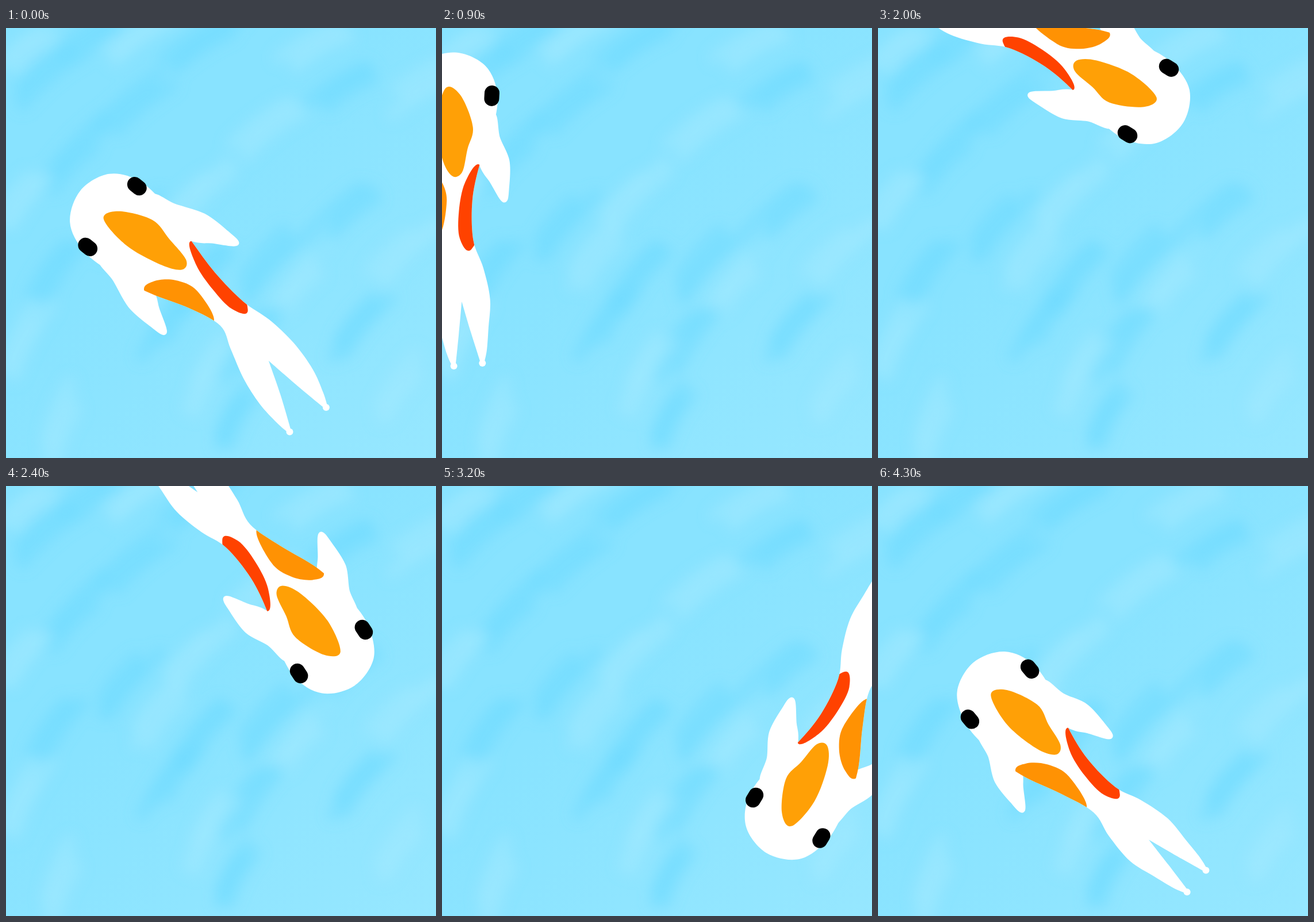
These frames come from a looping animation (748x748 px, 4400 ms). An HTML page:

```html
<!DOCTYPE html>
<html lang="en">
<head>
<meta charset="utf-8">
<title>Koi</title>
<style>
  html, body { margin: 0; width: 100%; height: 100%; overflow: hidden; background: #8ae4ff; }
  svg { display: block; width: 100vw; height: 100vh; }
</style>
</head>
<body>
<svg viewBox="0 0 748 748">
  <defs>
    <filter id="soft" filterUnits="userSpaceOnUse" x="-100" y="-100" width="948" height="948"><feGaussianBlur stdDeviation="11"/></filter>
    <clipPath id="skin"><path id="skinPath"/></clipPath>
    <linearGradient id="depth" x1="0" y1="0" x2="1" y2="1">
      <stop offset=".4" stop-color="#88e3ff"/><stop offset="1" stop-color="#96e7ff"/>
    </linearGradient>
  </defs>
  <rect width="748" height="748" fill="url(#depth)"/>
  <g id="water" fill="none" stroke-linecap="round" filter="url(#soft)"></g>
  <g id="fish">
    <g fill="#fff" stroke="#fff" stroke-width="8" stroke-linejoin="round">
      <path id="finR"/><path id="finL"/>
    </g>
    <path id="body" fill="#fff"/>
    <circle id="tipR" r="6" fill="#fff"/><circle id="tipL" r="6" fill="#fff"/>
    <path id="crown" fill="#ffa006"/>
    <g clip-path="url(#skin)">
      <path id="patch" fill="#ff9203"/>
      <path id="stripe" fill="#ff4200"/>
    </g>
    <rect id="eyeR" x="-18" y="-13" width="36" height="26" rx="13"/>
    <rect id="eyeL" x="-18" y="-13" width="36" height="26" rx="13"/>
  </g>
</svg>
<script>
const LOOP = 4400, STEP = 100;
const el = id => document.getElementById(id);
const dir = deg => [Math.cos(deg * Math.PI / 180), Math.sin(deg * Math.PI / 180)];
const fmt = p => p[0].toFixed(1) + ' ' + p[1].toFixed(1);

let seed = 7;
const rand = () => (seed = seed * 16807 % 2147483647) / 2147483647 - .5;

// Each spot is a bundle of strands that follow the current
function paintWater(color, spots) {
  for (const [x, y] of spots) {
    const [c, s] = dir(-38 - (35 * y - 14 * x) / 748);
    for (let i = 0; i < 3; i++) {
      const off = (i - 1) * 14 + rand() * 8, slide = rand() * 40, half = 55 + rand() * 30;
      const at = (u, v) => fmt([x + c * u - s * v, y + s * u + c * v]);
      el('water').innerHTML += `<path d="M${at(slide - half, off)}Q${at(slide, off - 10)} ${at(slide + half, off)}"
        stroke="${color}" stroke-width="22" opacity=".5"/>`;
    }
  }
}
paintWater('#70dbff', [[60, 90], [150, 15], [225, 130], [120, 225], [345, 25], [210, 340], [90, 420],
  [450, 415], [345, 430], [290, 510], [425, 540], [400, 680], [580, 110], [590, 320], [615, 520]]);
paintWater('#9feaff', [[30, 45], [230, 15], [25, 300], [325, 300], [265, 400], [460, 170], [540, 35],
  [735, 95], [520, 440], [355, 600], [30, 550], [100, 690], [690, 620], [690, 390]]);

// Places the head passes: time, x, y, angle of the back
const route = [
  [0, 185, 328, 39], [500, 68, 242, 50], [800, 5, 138, 82], [1050, 70, 85, 110],
  [1300, 197, 32, 136], [2000, 470, 127, 212], [2400, 566, 288, 236], [2800, 623, 424, 254],
  [3050, 640, 525, 274], [3350, 545, 612, 330], [3700, 387, 596, 377], [4300, 212, 362, 410]
];
const shift = ([t, x, y, a], n) => [t + n * LOOP, x, y, a + n * 360];
const keys = [shift(route[route.length - 1], -1), ...route, shift(route[0], 1), shift(route[1], 1)];

function hermite(a, b, m, n, f) {
  const g = f * f, h = g * f;
  return (2 * h - 3 * g + 1) * a + (h - 2 * g + f) * m + (3 * g - 2 * h) * b + (h - g) * n;
}
function slope(a, b, m, n, f) {
  return 6 * (f * f - f) * (a - b) + (3 * f * f - 4 * f + 1) * m + (3 * f * f - 2 * f) * n;
}
function headAt(t) {
  let i = 1;
  while (keys[i + 1][0] <= t) i++;
  const [p, a, b, q] = keys.slice(i - 1, i + 3), d = b[0] - a[0];
  return a.map((v, c) => hermite(v, b[c],
    (b[c] - p[c]) / (b[0] - p[0]) * d, (q[c] - v) / (q[0] - a[0]) * d, (t - a[0]) / d)).slice(1);
}

// Tail flicks in degrees: out and back at the start, and a strong one in the turn
const pulse = (t, at, width) => Math.exp(-(((t - at) / width) ** 2));
const wagAt = t => 27 * pulse(t, 0, 80) - 20 * pulse(t, 200, 110) - 56 * pulse(t, 2800, 200);

// Smooth curve through points, continuing from the first one
function curve(pts, closed) {
  const n = pts.length;
  const at = i => closed ? pts[(i + n) % n] : pts[Math.max(0, Math.min(n - 1, i))];
  let d = '';
  for (let i = 0; i < (closed ? n : n - 1); i++) {
    const [p, a, b, q] = [at(i - 1), at(i), at(i + 1), at(i + 2)];
    const c1 = a.map((v, j) => v + (b[j] - p[j]) / 6);
    const c2 = b.map((v, j) => v - (q[j] - a[j]) / 6);
    d += `C${fmt(c1)} ${fmt(c2)} ${fmt(b)}`;
  }
  return d;
}
const blob = pts => 'M' + fmt(pts[0]) + curve(pts, true) + 'Z';

// Markings as (place along spine, offset to the right)
const marks = {
  crown: [[-.07, -13], [.02, 14], [.42, 41], [.75, 36], [1.1, 27], [1.14, 9], [.9, -7], [.4, -22]],
  patch: [[.95, -62], [.95, -38], [1.15, -13], [1.45, -6], [1.88, -33], [1.4, -75]],
  stripe: [[1, 58], [1.25, 30], [1.6, 12], [1.95, 6], [2.13, 24], [1.6, 66]]
};

function draw(t) {
  const [x, y, head] = headAt(t), [bx, by] = dir(head);
  const wag = wagAt(t), force = Math.min(30, Math.abs(wag));
  const spread = 25 + force / 2, fin = 180 + wag * .65, sway = Math.max(0, -wag) * .7;

  // Spine: the flick grows toward the tail
  const joints = [[x, y]];
  [[2, 126 + wag * .3], [wag * .35 - 11, 134], [wag * .8 - 8, 104], [wag - 9, 110 + force / 2]].forEach(([turn, len], i) => {
    const d = dir(head + turn);
    joints.push(joints[i].map((v, j) => v + d[j] * len));
  });
  const tangents = joints.map((p, i) =>
    i === 0 ? [bx * 128, by * 128] :
    i === 4 ? p.map((v, j) => v - joints[3][j]) :
    p.map((v, j) => (joints[i + 1][j] - joints[i - 1][j]) / 2));

  const local = (u, v) => [x + bx * u + by * v, y + by * u - bx * v];
  const place = ([k, w]) => {
    if (k < 0) return local(k * 128, w);
    const i = Math.min(3, Math.floor(k)), f = k - i;
    const args = j => [joints[i][j], joints[i + 1][j], tangents[i][j], tangents[i + 1][j], f];
    const dx = slope(...args(0)), dy = slope(...args(1)), len = Math.hypot(dx, dy);
    return [hermite(...args(0)) + dy / len * w, hermite(...args(1)) - dx / len * w];
  };

  const side = [[-.4, 54], [0, 78], [.5, 74], [1, 58], [1.5, 38], [2, 29], [2.45, 42],
    [3, 42 + spread * .3], [3.45, spread + 17], [3.8, spread + 10], [4, spread + 3]];
  const mirror = side.map(([k, w]) => [k, -w]).reverse();
  const outer = [...mirror, [-.56, 0], ...side].map(place);
  const fork = place([3, 0]);
  const inner = s => [[4, s * (spread - 3)], [3.5, s * spread * .42]].map(place);
  const outline = 'M' + fmt(outer[0]) + curve(outer) + 'L' + fmt(inner(1)[0]) + curve([...inner(1), fork]) +
    curve([fork, ...inner(-1).reverse()]) + 'Z';
  el('body').setAttribute('d', outline);
  el('skinPath').setAttribute('d', outline);

  for (const [name, s] of [['R', 1], ['L', -1]]) {
    const sh = sway * s;
    el('fin' + name).setAttribute('d', blob([
      [30, 70], [72, 82], [fin * .62, 101 + sh * .5], [fin * .87, 103 + sh * .9], [fin, 99 + sh],
      [fin * .82, 76 + sh * .6], [fin * .66, 56], [40, 30]
    ].map(([u, v]) => local(u, v * s))));
    el('tip' + name).setAttribute('transform', `translate(${fmt(place([4, s * spread]))})`);
    el('eye' + name).setAttribute('transform', `translate(${fmt(local(0, 68 * s))}) rotate(${head.toFixed(1)})`);
  }
  for (const name in marks) el(name).setAttribute('d', blob(marks[name].map(place)));
}

const start = performance.now();
let shown = -1;
function tick() {
  const t = Math.floor((performance.now() - start) % LOOP / STEP) * STEP;
  if (t !== shown) draw(shown = t);
  requestAnimationFrame(tick);
}
tick();
</script>
</body>
</html>
```
